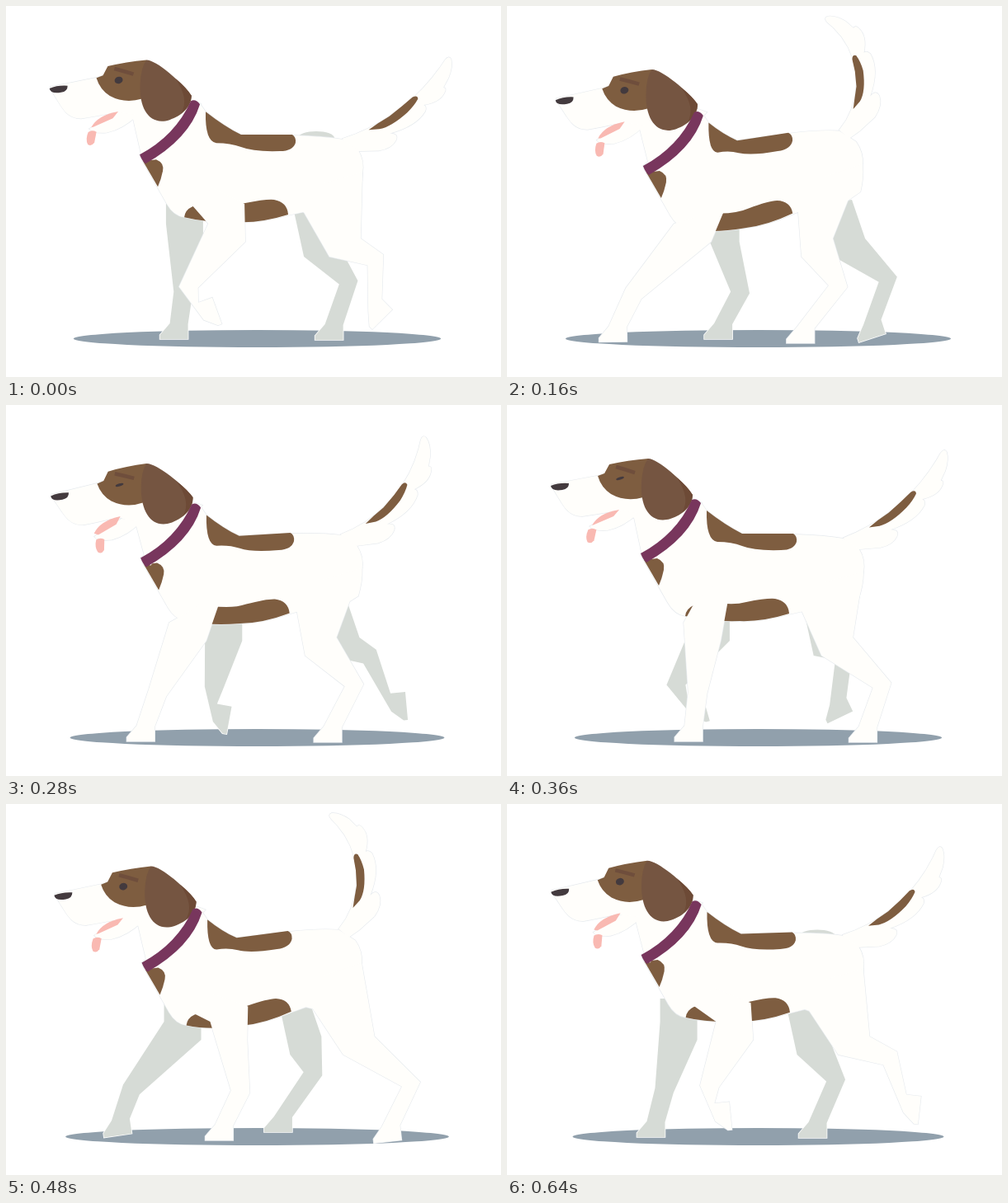
An HTML page with a canvas that plays this animation: 600x450 px, repeating every 680 ms.

```html
<!DOCTYPE html>
<html lang="en">
<head>
<meta charset="utf-8">
<title>Walking dog</title>
<style>
html, body { margin: 0; width: 100%; height: 100%; overflow: hidden; background: #fff; }
canvas { display: block; }
</style>
</head>
<body>
<canvas id="stage" width="600" height="450"></canvas>
<script>
const ctx = document.getElementById('stage').getContext('2d');
const LOOP = 680, STEP = 40, TAU = 2 * Math.PI;
const WHITE = '#fffefb', FAR = '#d6dbd6', BROWN = '#7e5d40', EAR = '#755541',
  DARK = '#433a3e', PINK = '#f9b9b2';

// Peaks are the times in ms at which a part is furthest forward or highest
const FRONT = {
  hip: 227, hipPeak: 235, hipSwing: 32, girth: 45, hipY: 264, elbowY: 286,
  knee: 220, kneeSwing: 67, kneeY: 349, kneeRise: .4,
  paw: 198, pawSwing: 69, pawPeak: 190, pawY: 390, kick: 0,
  lift: 20, liftPeak: 10, liftPower: 2, fold: -110, foldPeak: 0, foldPower: 2
};
const REAR = {
  hip: 384, hipPeak: 200, hipSwing: 29, girth: 38, hipY: 304, elbowY: 282,
  knee: 447, kneeSwing: 46, kneeY: 340, kneeRise: 1.15,
  paw: 412, pawSwing: 52, pawPeak: 180, pawY: 391, kick: 50,
  lift: 28, liftPeak: 665, liftPower: .7, fold: -98, foldPeak: 605, foldPower: 3
};
const PAW = [[-11, -1], [-23, 13], [-23, 18], [11, 18], [11, 0]];

const clamp = (v, lo, hi) => Math.min(hi, Math.max(lo, v));
const rad = deg => deg * Math.PI / 180;
const angleAt = (t, peak) => TAU * (t - peak) / LOOP;
const wave = (t, peak) => Math.cos(2 * angleAt(t, peak));
const pulse = (t, peak, power) => Math.max(0, Math.cos(angleAt(t, peak))) ** power;

// Forward and back once per loop; skew makes the return to the front quicker
function sway(t, peak, skew = 0) {
  const a = angleAt(t, peak);
  return -Math.cos(a + skew * Math.sin(a));
}

function rotate([x, y], a) {
  const c = Math.cos(a), s = Math.sin(a);
  return [x * c - y * s, x * s + y * c];
}

function unit(x, y) {
  const d = Math.hypot(x, y);
  return [x / d, y / d];
}

// Path from text, each x,y pair sent through a map
const shape = (d, map) => new Path2D(
  d.replace(/(-?[\d.]+),(-?[\d.]+)/g, (_, x, y) => map([+x, +y]).map(v => v.toFixed(2))));
const poly = pts => new Path2D('M' + pts.map(p => p.join()).join('L') + 'Z');

function ellipse(x, y, rx, ry, turn = 0) {
  const path = new Path2D();
  path.ellipse(x, y, rx, ry, turn, 0, TAU);
  return path;
}

function fill(path, color) {
  ctx.fillStyle = color;
  ctx.fill(path);
}

function outline(path, color, width) {
  ctx.strokeStyle = color;
  ctx.lineWidth = width;
  ctx.stroke(path);
}

function leg(g, t, top, hipShift = 0, pawShift = 0, raise = 0) {
  const fx = g.hip + hipShift + g.hipSwing * sway(t, g.hipPeak), ex = fx + g.girth;
  const rise = g.lift * pulse(t, g.liftPeak, g.liftPower) + raise;
  const kx = g.knee + pawShift + g.kneeSwing * sway(t, 172);
  const ky = g.kneeY - g.kneeRise * rise;
  const ax = g.paw + pawShift + g.pawSwing * sway(t, g.pawPeak, .42) + g.kick * pulse(t, 590, 4);
  const ay = g.pawY - rise;

  const upper = unit(kx - (fx + ex) / 2, ky - (g.hipY + g.elbowY) / 2);
  const lower = unit(ax - kx, ay - ky);
  const [dx, dy] = unit(upper[0] + lower[0], upper[1] + lower[1]).map(v => v * 11.5);
  const fold = rad(g.fold * pulse(t, g.foldPeak, g.foldPower));
  const paw = PAW.map(p => rotate(p, fold)).map(([x, y]) => [x + ax, y + ay]);
  return poly([[fx, g.hipY], [kx - dy, ky + dx], ...paw, [kx + dy, ky - dx],
    [ex, g.elbowY], ...top(fx, ex)]);
}

function draw(t) {
  const sink = (1 - wave(t, 12)) / 2;
  const open = ((1 + wave(t, 240)) / 2) ** 2;

  // The chest drops while the hips rise
  const body = ([x, y]) => {
    const rear = clamp((x - 240) / 45, 0, 1);
    return [x + sink * (3 * (1 - rear) + rear * (-6 + (y - 158) * .11)),
            y + sink * clamp(14.5 - .157 * (x - 240), -11, 14.5)];
  };
  const nod = -(4 + 6 * wave(t, 235)) / 148;
  const head = ([x, y]) => {
    const [rx, ry] = rotate([x - 200, y - 130], nod);
    return [rx + 201 + 7 * sink, ry + 129 + 11.5 * sink];
  };
  const jaw = ([x, y]) => head([x + 4 * open, y + 4 * open]);
  const tongue = ([x, y]) => head([x + 9 * open + (y - 150) * .2 * open, y + 4 * open]);

  // The tail is an arc from the rump that rises and curls together
  const length = 159 + 7 * wave(t, 0);
  const curl = rad(69 - 28 * wave(t, 8)), root = rad(68 - 30 * wave(t, -8)) - curl / 2;
  const base = body([408, 161]);
  const tail = ([u, v]) => {
    const q = root + curl * u / 100;
    return [base[0] + length * (Math.sin(q) - Math.sin(root)) / curl + v * Math.sin(q),
            base[1] + length * (Math.cos(q) - Math.cos(root)) / curl + v * Math.cos(q)];
  };

  ctx.clearRect(0, 0, 600, 450);
  fill(ellipse(304.5, 403.5, 222.5 + 11.5 * sink, 10.5), '#91a0ac');

  const opposite = t + LOOP / 2;
  const farLegs = [
    leg(FRONT, opposite, (f, e) => [[e, 236], [f, 236]], -15, -4, 4),
    leg(REAR, opposite, (f, e) => [[e - 16, 235], [f - 14, 240]], -15, -31, 4)];
  farLegs.forEach(p => outline(p, '#fff', 1.6));
  farLegs.forEach(p => fill(p, FAR));
  fill(ellipse(376, 160, 22, Math.max(0, 8 * Math.cos(angleAt(t, 0)))), FAR);

  const tailShape = shape('M0,0 L10,0 20,0 30,0 40,0 50,0 60,0 70,0 80,0 90,0 96,0 Q101,1 99,6 ' +
    'Q95,13 87,16 L80,18 Q81,22 78,23 Q71,27 62,15 Q63,19 60,22 Q49,29 32,18 Q37,24 33,29 ' +
    'Q28,35 20,30 L8,21 0,16Z', tail);
  const torso = shape('M235,118 L242,128 Q265,146 285,156 L350,157 Q385,158 408,162 L427,175 ' +
    'Q435,188 432,204 Q432,218 426,236 L385,260 360,250 342,254 Q310,263 282,262 ' +
    'Q245,263 216,256 Q203,254 195,240 L183,219 165,187 162,180Z', body);
  const front = leg(FRONT, t, (f, e) => [[.7 * e + 86, 240], [250, 220], [226, 242]].map(body));
  const rear = leg(REAR, t, f => [[432, 202], [385, 215], [.33 * f + 231, 249]].map(body));
  const skull = shape('M53,97 L75,93 112,86 165,70 215,112 235,120 168,190 162,180 153,138 ' +
    'L133,129 Q105,134 90,136 C70,136 66,119 53,100Z', head);
  const chin = shape('M133,128 L158,132 Q140,149 120,153 Q103,154 99,148Z', jaw);

  const whites = [tailShape, torso, rear, front, skull, chin];
  whites.forEach(p => outline(p, '#e6eaee', 1.3));
  fill(tailShape, WHITE);
  fill(shape('M20,2 L28,0 38,0 50,-1 60,-1 Q64,1 62,5 Q57,8 50,9 Q35,12 27,7Z', tail), BROWN);
  fill(torso, WHITE);
  fill(rear, WHITE);
  fill(shape('M242,128 Q265,146 285,156 L347,156 Q352,159 351,166 Q348,176 332,176 ' +
    'Q300,177 285,171 Q272,166 255,166 Q241,164 242,128Z', body), BROWN);
  fill(shape('M216,256 Q217,247 226,243 L245,238 Q272,244 290,239 Q315,234 325,235 ' +
    'Q341,238 342,253 Q310,263 282,262 Q245,263 216,256Z', body), BROWN);
  fill(shape('M166,188 L182,186 Q192,190 190,200 Q188,210 184,219Z', body), BROWN);
  fill(front, WHITE);

  fill(skull, WHITE);
  fill(chin, WHITE);
  const lip = 4 * open;
  fill(shape(`M135,128 Q110,132 102,147 L${104 + lip},${146 + lip} ${128 + lip / 2},${136 + lip / 2}Z`,
    head), PINK);
  fill(shape('M97,152 Q102,149 107,152 L104,165 Q100,170 96,167 Q93,161 97,152Z', tongue), PINK);
  fill(shape('M109,87 L117,84 123,73 Q145,68 170,66 L175,100 164,113 Q143,119 125,109 Q113,101 109,87Z',
    head), BROWN);
  fill(shape('M170,66 C182,66 213,94 224,110 C223,125 212,134 197,139 ' +
    'C174,146 160,127 162,95 Q163,75 170,66Z', head), EAR);
  fill(shape('M205,89 Q219,101 224,110 Q224,122 211,131 Q222,115 205,89Z', head), '#6d4a36');
  outline(shape('M131,76 Q142,79 154,83', head), '#6f4e3c', 4.5);
  fill(ellipse(...head([136, 90]), 5, 4.2 - 3.4 * pulse(t, 320, 4), -.3), DARK);
  fill(shape('M52,99 Q62,95 74,96 Q74,103 66,104 Q53,106 52,99Z', head), DARK);
  fill(shape('M224,115 Q230,112 235,119 Q222,161 169,191 Q165,188 162,180 Q205,157 224,115Z', body),
    '#78365d');
}

function frame(now) {
  draw(Math.floor(now % LOOP / STEP) * STEP);
  requestAnimationFrame(frame);
}
requestAnimationFrame(frame);
</script>
</body>
</html>
```
